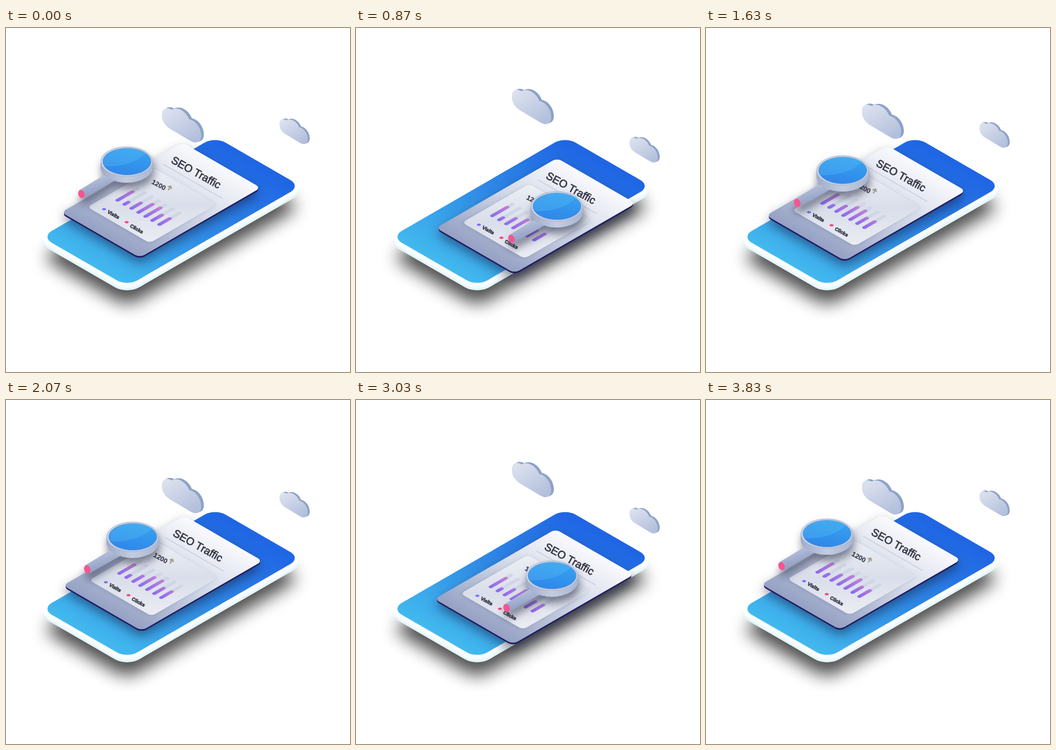
Recreate the animation shown at these times as an HTML page. Size 640 by 640 pixels, loop 3.86 s.

```html
<!DOCTYPE html>
<html lang="en">
<head>
<meta charset="utf-8">
<title>SEO Traffic</title>
<style>
html, body { margin: 0; height: 100%; overflow: hidden; background: #fff; }
svg { display: block; width: 100vw; height: 100vh; filter: blur(.5px); }
text { font-family: "Liberation Sans", Arial, sans-serif; fill: #3a3b49; stroke: #3a3b49; }
#cardShape { filter: drop-shadow(0 9px 10px rgba(20, 25, 60, .5)); }
#panel { filter: drop-shadow(0 2px 4px rgba(60, 70, 110, .2)); }
#glass { filter: drop-shadow(2px 11px 8px rgba(30, 35, 60, .55)); }
</style>
</head>
<body>
<svg viewBox="0 0 640 640">
  <defs>
    <linearGradient id="screenFill" x2="0" y2="1">
      <stop stop-color="#1f64e4"/><stop offset=".5" stop-color="#2f8ae6"/><stop offset="1" stop-color="#42b9ee"/>
    </linearGradient>
    <linearGradient id="paper" x2="0" y2="1">
      <stop stop-color="#fafafd"/><stop offset=".45" stop-color="#d3d9e8"/><stop offset="1" stop-color="#95a1c4"/>
    </linearGradient>
    <linearGradient id="panelFill" x2="1" y2="1">
      <stop stop-color="#eceff5"/><stop offset=".5" stop-color="#d9deea"/><stop offset="1" stop-color="#ecedf3"/>
    </linearGradient>
    <linearGradient id="bar" gradientUnits="userSpaceOnUse" x1="0" y1="178" x2="0" y2="142">
      <stop stop-color="#8f6bf0"/><stop offset="1" stop-color="#c381d0"/>
    </linearGradient>
    <linearGradient id="cloudFill" x2=".7" y2="1">
      <stop stop-color="#e0e4f0"/><stop offset="1" stop-color="#b3c0dc"/>
    </linearGradient>
    <linearGradient id="rim">
      <stop stop-color="#9eabcb"/><stop offset=".5" stop-color="#c3cce0"/><stop offset="1" stop-color="#a9b6d3"/>
    </linearGradient>
    <linearGradient id="grip" x2=".5" y2="1">
      <stop offset=".2" stop-color="#b9c3dc"/><stop offset=".8" stop-color="#93a1c5"/>
    </linearGradient>
    <linearGradient id="lens" x1=".7" x2=".3" y2="1">
      <stop stop-color="#36a2ee"/><stop offset="1" stop-color="#2f86ea"/>
    </linearGradient>
    <filter id="blur" x="-30%" y="-30%" width="160%" height="160%"><feGaussianBlur stdDeviation="16"/></filter>
    <rect id="body" x="-6" y="-6" width="196" height="385" rx="26" transform="matrix(.866 .5 -.866 .5 389 202)"/>
    <rect id="screen" width="184" height="373" rx="22" transform="matrix(.866 .5 -.866 .5 389 202)"/>
    <rect id="sheet" width="168.6" height="260" rx="10" transform="matrix(.866 .5 -.866 .5 328 213)"/>
    <path id="puff" d="M290 163C289 150 299 146 308 152C318 146 334 153 341 170C352 172 362 184 363 198C364 208 359 214 350 213Q347 212 343 210L306 188C296 182 290 173 290 163Z"/>
    <g id="cloud">
      <use href="#puff" x="5" y="-2" fill="#8ea2c8"/>
      <use href="#puff" x="2.5" y="-1" fill="#8ea2c8"/>
      <use href="#puff" fill="url(#cloudFill)"/>
    </g>
  </defs>

  <use href="#screen" y="38" filter="url(#blur)" opacity=".7"/>
  <use href="#body" y="9" fill="#e4f5fa"/>
  <use href="#body" y="5" fill="#f3fbfd"/>
  <use href="#body" fill="#fff"/>
  <use href="#screen" fill="url(#screenFill)"/>

  <g id="cloudA"><use href="#cloud"/></g>
  <g id="cloudB"><use href="#cloud" transform="translate(300 61.5) scale(.72 .725)"/></g>

  <g id="card">
    <g id="cardShape">
      <use href="#sheet" y="3" fill="#211c62"/>
      <use href="#sheet" y="1.5" fill="#211c62"/>
      <use href="#sheet" fill="url(#paper)"/>
    </g>
    <g transform="matrix(.866 .5 -.866 .5 328 213)">
      <path d="M20 61H147" stroke="#c8d0e0" stroke-width="2"/>
      <rect id="panel" x="18" y="78" width="134" height="144" rx="8" fill="url(#panelFill)"/>
      <g id="bars" stroke-width="6.8" stroke-linecap="round"></g>
      <circle cx="40" cy="208" r="3" fill="#7873f5"/>
      <circle cx="88.5" cy="208" r="3" fill="#ee4a80"/>
    </g>
    <text transform="translate(306 250) rotate(29)" font-size="20" stroke-width=".8">SEO Traffic</text>
    <g font-weight="bold">
      <text transform="translate(270 289) rotate(29)" font-size="12.5" stroke-width=".2">1200</text>
      <g font-size="9" stroke-width=".7">
        <text transform="translate(188 344) rotate(29)">Visits</text>
        <text transform="translate(230 370) rotate(29)">Clicks</text>
      </g>
    </g>
    <path d="M0 0V-9M-4 -5L0 -9L4 -5" transform="translate(302 302) rotate(29)" fill="none" stroke="#a39d8e" stroke-width="2.4"/>
  </g>

  <g id="glass">
    <path d="M136 302L182 274L204 283L145 316Z" fill="url(#grip)"/>
    <ellipse cx="140.300" cy="309" rx="5.800" ry="7.800" fill="#f4568f" transform="rotate(-22 140.300 309)"/>
    <path d="M176 248.500V259A48.500 29 0 0 0 273 259V248.500Z" fill="url(#rim)"/>
    <ellipse cx="224.500" cy="248.500" rx="48" ry="27.500" fill="#d0d7e6" stroke="#a5b0ca"/>
    <ellipse cx="225" cy="248.500" rx="45" ry="25" fill="url(#lens)" stroke="#7d9fd0"/>
    <path d="M183 241C195 222 240 217 261 232C246 249 214 259 184 257Q179 249 183 241Z" fill="#5cc0f4" opacity=".3"/>
  </g>
</svg>
<script>
const LOOP = 3860, PERIOD = 1901;
const $ = id => document.getElementById(id);

const barLine = (x, length, paint) => `<path d="M${x} 177v${-length}" stroke="${paint}"/>`;
$('bars').innerHTML = [32, 8, 20, 30, 32, 20, 22].map((length, i) => {
  const x = 38 + 15 * i;
  return barLine(x, 43, '#cfd6e4') + barLine(x, length, 'url(#bar)');
}).join('');

const move = (id, x, y) => $(id).setAttribute('transform', `translate(${x} ${y})`);

function draw() {
  const t = performance.now() % LOOP;
  const p = (1 - Math.cos(2 * Math.PI * (t - 6) / PERIOD)) / 2;
  move('glass', 152 * p, 85 * p);
  move('card', 47 * p, 29.5 * p);
  move('cloudA', 0, -35 * p);
  move('cloudB', 0, 35 * p);
  requestAnimationFrame(draw);
}
draw();
</script>
</body>
</html>
```
